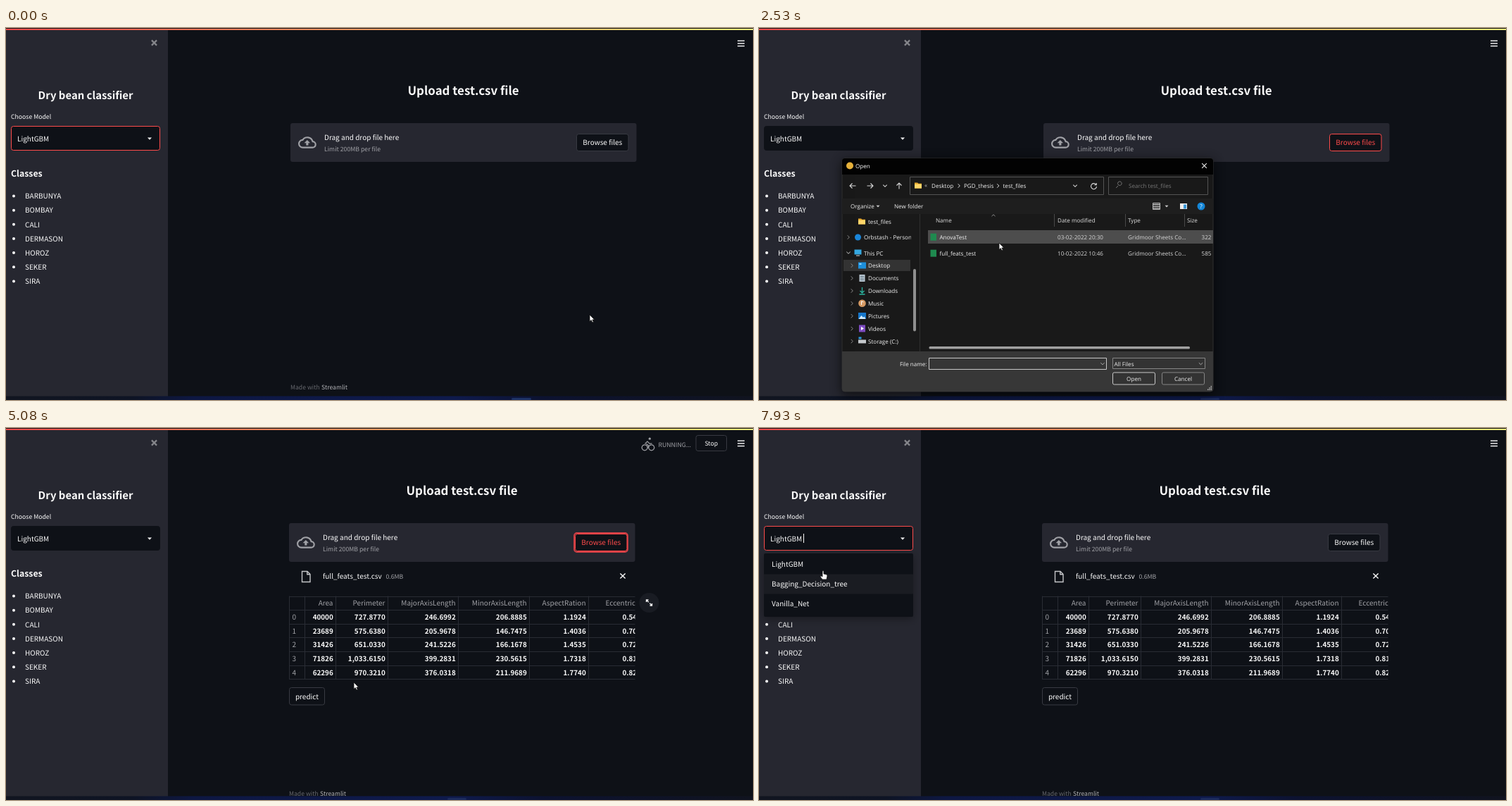
Animation of 1061 by 528 pixels, one loop 8 s. Source, as an HTML page with a canvas:

```html
<!DOCTYPE html>
<html lang="en">
<head>
<meta charset="utf-8">
<title>Dry bean classifier</title>
<style>
html, body { margin: 0; width: 100%; height: 100%; overflow: hidden; background: #0e1117; }
canvas { display: block; width: 1061px; height: 528px; }
</style>
</head>
<body>
<canvas id="stage" width="1061" height="528"></canvas>
<script>
const ctx = document.getElementById('stage').getContext('2d');
const LOOP = 8000;
const PAGE = '"Noto Sans CJK JP", "Noto Sans CJK SC", "Noto Sans CJK KR", "Noto Sans", sans-serif';
const SYSTEM = '"Open Sans", "Noto Sans", sans-serif';
const BG = '#0e1117', PANEL = '#262730', WHITE = '#fafafa', RED = '#ff4b4b';
const GREY = '#a0a1a6', EDGE = '#383a42', GRID = '#292c34';

// Moments at which the interface changes
const T = {
  press: 1390, dialogOpen: 1930, hoverFile: 2400, pickFile: 2740, dialogClose: 4410,
  uploaded: 4620, table: 4800, blur: 5880, done: 6250, menu: 6860, pointMenu: 7120
};

// Pointer stops: time, x, y
const PATH = [
  [0, 829, 407], [160, 829, 407], [920, 849, 164], [1060, 850, 165], [1390, 850, 165],
  [1790, 830, 172], [1860, 830, 172], [2190, 420, 236], [2270, 420, 236], [2530, 341, 305],
  [2810, 300, 317], [3030, 300, 317], [3780, 549, 513], [3850, 549, 513], [4060, 546, 504],
  [4200, 541, 497], [4340, 541, 497], [5080, 494, 361], [5150, 494, 361], [5750, 430, 380],
  [5980, 430, 380], [6720, 150, 167], [6790, 150, 167], [6990, 137, 174],
  [7590, 100, 245], [7660, 100, 245], [7930, 91, 203], [8000, 91, 203]
];
const HAND_TIMES = [[830, 1480], [5560, 6070], [6640, 6900], [T.pointMenu, LOOP]];

const within = (t, a, b) => t >= a && t < b;

function pointerAt(t) {
  const i = Math.max(1, PATH.findIndex(p => p[0] > t));
  const [t0, x0, y0] = PATH[i - 1], [t1, x1, y1] = PATH[i];
  const u = (t - t0) / (t1 - t0), e = u * u * (3 - 2 * u);
  return { x: x0 + (x1 - x0) * e, y: y0 + (y1 - y0) * e };
}

function box(x, y, w, h, fill, stroke, radius = 0, width = 1) {
  ctx.beginPath();
  ctx.roundRect(x, y, w, h, radius);
  if (fill) { ctx.fillStyle = fill; ctx.fill(); }
  if (stroke) { ctx.strokeStyle = stroke; ctx.lineWidth = width; ctx.stroke(); }
}

function disc(x, y, r, fill) {
  ctx.beginPath();
  ctx.arc(x, y, r, 0, Math.PI * 2);
  ctx.fillStyle = fill;
  ctx.fill();
}

function shape(d, x, y, scale, { fill, stroke, width = 1 }) {
  const path = new Path2D(d);
  ctx.save();
  ctx.translate(x, y);
  ctx.scale(scale, scale);
  if (fill) { ctx.fillStyle = fill; ctx.fill(path); }
  if (stroke) { ctx.strokeStyle = stroke; ctx.lineWidth = width; ctx.stroke(path); }
  ctx.restore();
}

const stroke = (d, x, y, color, width = 1) => shape(d, x, y, 1, { stroke: color, width });
const fill = (d, x, y, color) => shape(d, x, y, 1, { fill: color });

function write(str, x, y, size, color, align, weight, family) {
  ctx.font = `${weight} ${size}px ${family}`;
  ctx.textAlign = align;
  ctx.fillStyle = color;
  ctx.fillText(str, x, y);
}
const text = (str, x, y, size = 10, color = WHITE, align = 'left', weight = 400) =>
  write(str, x, y, size, color, align, weight, PAGE);
// Dialog labels are placed by their vertical centre
const label = (str, x, y, color = '#f0f0f0', align = 'left') =>
  write(str, x, y + 3, 8.1, color, align, 400, SYSTEM);

function clipped(x, y, w, h, draw) {
  ctx.save();
  ctx.beginPath();
  ctx.rect(x, y, w, h);
  ctx.clip();
  draw();
  ctx.restore();
}

const cross = (x, y, r, color, width) =>
  stroke(`M${-r} ${-r}L${r} ${r}M${r} ${-r}L${-r} ${r}`, x, y, color, width);

function button(str, x, y, w, h, size, hot) {
  box(x + .5, y + .5, w - 1, h - 1, BG, hot ? RED : EDGE, 3);
  text(str, x + w / 2, y + h / 2 + 3.8, size, hot ? RED : WHITE, 'center');
}

function drawSidebar(t) {
  box(0, 0, 230, 523, PANEL);
  cross(210.5, 21, 3.6, '#85868b', 2.2);
  text('Dry bean classifier', 113, 100.5, 14.9, WHITE, 'center', 600);
  text('Choose Model', 7, 129.3, 8.7);
  const focused = t < T.press || t >= 6790;
  box(7.5, 139.5, 211, 34, BG, focused ? RED : BG, 3);
  text('LightGBM', 16, 160.5);
  fill('M-3 -1.5H3L0 1.7Z', 204, 157, WHITE);
  text('Classes', 7, 211, 12.3, WHITE, 'left', 600);
  ['BARBUNYA', 'BOMBAY', 'CALI', 'DERMASON', 'HOROZ', 'SEKER', 'SIRA'].forEach((name, i) => {
    const y = 238.6 + i * 20.13;
    disc(11, y, 2, WHITE);
    text(name, 27, y + 3.7);
  });
}

function drawMenu(t, pointer) {
  if (t < T.menu) return;
  ctx.save();
  ctx.shadowColor = 'rgba(0,0,0,.35)';
  ctx.shadowBlur = 12;
  ctx.shadowOffsetY = 3;
  box(7, 178, 212, 90, BG, null, 2);
  ctx.restore();
  const pointing = t >= T.pointMenu;
  const row = pointing ? Math.min(2, Math.max(0, Math.floor((pointer.y + 5 - 179) / 28))) : 0;
  box(7, 179.5 + row * 28, 212, 28, pointing ? '#1a1c22' : '#21232b');
  ['LightGBM', 'Bagging_Decision_tree', 'Vanilla_Net'].forEach((name, i) =>
    text(name, 18, 197 + i * 28));
  if ((t - T.menu) % 1000 < 500) box(63, 150, 1, 13, WHITE);
}

function drawUploader(t, dx) {
  text('Upload test.csv file', 649.5 + dx, 94.5, 16.9, WHITE, 'center', 600);
  box(404 + dx, 135, 491.5, 55, PANEL, null, 3);
  ctx.save();
  ctx.translate(415 + dx, 149.3);
  shape('M6 19H19A4 4 0 0 0 19.2 11A7.3 7.3 0 0 0 6 9A5 5 0 0 0 6 19Z', 0, 0, 1.07, { stroke: GREY, width: 2 });
  shape('M8 13h2.55v3h2.9v-3H16l-4-4z', 0, 0, 1.07, { fill: GREY });
  ctx.restore();
  text('Drag and drop file here', 452 + dx, 158.8);
  text('Limit 200MB per file', 452 + dx, 175.4, 8.7, GREY);
  const hot = within(t, 840, T.blur);
  if (within(t, T.dialogClose, T.blur))
    box(809 + dx, 149, 76, 27, null, '#d64046', 4, 1.8);
  button('Browse files', 810 + dx, 150, 74.5, 25, 10, hot);
}

function drawTable() {
  const edges = [402.5, 424.5, 468.5, 542.5, 642.5, 743.5, 827.5];
  const heads = ['', 'Area', 'Perimeter', 'MajorAxisLength', 'MinorAxisLength', 'AspectRation'];
  const rows = [
    ['40000', '727.8770', '246.6992', '206.8885', '1.1924', '0.54'],
    ['23689', '575.6380', '205.9678', '146.7475', '1.4036', '0.70'],
    ['31426', '651.0330', '241.5226', '166.1678', '1.4535', '0.72'],
    ['71826', '1,033.6150', '399.2831', '230.5615', '1.7318', '0.81'],
    ['62296', '970.3210', '376.0318', '211.9689', '1.7740', '0.82']
  ];
  const pitch = 19.65;
  clipped(402, 238, 491.5, 120, () => {
    for (let i = 0; i < 7; i++) box(402, Math.round(238.5 + i * pitch), 492, 1, GRID);
    edges.forEach(x => box(x - .5, 238.5, 1, 118, GRID));
    heads.forEach((h, i) => text(h, (edges[i + 1] || 0) - 4, 252.2, 10, GREY, 'right'));
    text('Eccentricity', 851.5, 252.2, 10, GREY);
    rows.forEach((cells, r) => {
      const y = 272 + r * pitch;
      text(String(r), 406.5, y, 10, GREY);
      cells.forEach((value, c) => c < 5
        ? text(value, edges[c + 2] - 3.8, y, 9.85, WHITE, 'right', 600)
        : text(value, 875.5, y, 9.85, WHITE, 'left', 600));
    });
  });
}

function drawResults(t) {
  if (t < T.uploaded) return;
  stroke('M-5.5 -7.5H2L6 -3.5V7.5H-5.5ZM1.8 -7.5V-3.2H6', 426, 211, '#c4c5c8', 1.4);
  text('full_feats_test.csv', 450, 214.3);
  text('0.6MB', 539.5, 214.3, 8.7, GREY);
  cross(876, 210, 3.6, WHITE, 1.4);
  if (t < T.table) return;
  drawTable();
  if (t < 5260) {
    disc(913.5, 248, 14, '#191c23');
    stroke('M-4 -1V-4H-1M-4 -4L-.8 -.8M4 1V4H1M4 4L.8 .8', 913.5, 248, WHITE, 1.3);
  }
  button('predict', 402, 368, 51, 25.5, 10, within(t, 5560, 6070));
}

function drawToolbar(t) {
  [17.5, 21.2, 24.9].forEach(y => box(1039, y, 10, 1.4, WHITE));
  if (!within(t, T.uploaded, T.done)) return;
  stroke('M-4.8 -.2A4 4 0 1 1 -4.9 -.2M4.8 -.2A4 4 0 1 1 4.7 -.2M-4.5 -1.5L-1 -5L2 -1.8H5.5M-2.5 -1.5L.3 .8V4.5', 912, 24, GREY, 1.2);
  disc(914.3, 15.2, 1.6, GREY);
  text('RUNNING...', 926.5, 26.7, 8.7, GREY);
  button('Stop', 979.5, 10, 44.5, 23, 8.7, false);
}

function drawFooter(t, dx) {
  const y = t >= T.table ? 521.7 : 513.2;
  clipped(230, 480, 831, 43, () => {
    text('Made with', 404 + dx, y, 8.65, '#66686e');
    text('Streamlit', 448 + dx, y, 8.65, '#b0b1b5');
  });
}

function drawFrame(t) {
  const sky = ctx.createLinearGradient(0, 0, 1061, 0);
  [[0, '#111520'], [.17, '#0e1424'], [.25, '#0d1742'], [.6, '#0e1a4c'], [.72, '#0c1230'], [1, '#10131f']]
    .forEach(stop => sky.addColorStop(...stop));
  box(0, 522.5, 1061, 6, sky);
  if (t < 500) box(718, 525, 28, 3, '#1d3164', null, 1.5);
  if (t > 1650) box(627, 525, 27, 3, '#1c2b5c', null, 1.5);
  const ribbon = ctx.createLinearGradient(0, 0, 1061, 0);
  ribbon.addColorStop(0, '#f84b4b');
  ribbon.addColorStop(1, '#f5f27c');
  box(0, 0, 1061, 1, '#15161b');
  box(0, 1, 1061, 2, ribbon);
}

const CHEVRON_RIGHT = 'M-1.3 -2.7L1.3 0L-1.3 2.7';
const CHEVRON_DOWN = 'M-2.7 -1.3L0 1.3L2.7 -1.3';

function folder(x, y) {
  fill('M-5 -4H-1L.5 -2.8H5V4H-5Z', x, y, '#e8a92c');
  box(x - 5, y - 1.8, 10, 5.8, '#ffd66b');
}

function drawDialogNav() {
  [['M4.5 0H-4M-.5 -3.5L-4 0L-.5 3.5', 133], ['M-4.5 0H4M.5 -3.5L4 0L.5 3.5', 158],
   [CHEVRON_DOWN, 179], ['M0 4.5V-4M-3.5 -.5L0 -4L3.5 -.5', 199], [CHEVRON_DOWN, 449]]
    .forEach(([d, x]) => stroke(d, x, 224, '#d8d8d8', 1.1));
  box(214.5, 211.5, 275, 25, null, '#535353');
  folder(226, 223.5);
  label('«', 235, 223, '#bbb');
  label('Desktop', 245, 223.5);
  label('PGD_thesis', 291, 223.5);
  label('test_files', 346.5, 223.5);
  stroke(CHEVRON_RIGHT, 284, 224, '#ddd');
  stroke(CHEVRON_RIGHT, 339.5, 224, '#ddd');
  stroke('M3 -2.5A4 4 0 1 0 4 .5M3.7 -4.5V-1.8H1', 475.5, 224.5, '#ddd', 1.1);
  box(496.5, 211.5, 141, 25, null, '#535353');
  stroke('M-3.8 4L-1 1M-1.2 -1.2A2.8 2.8 0 1 1 -1.1 -1', 511, 223, '#777');
  label('Search test_files', 525, 223.5, '#777');

  box(118, 242, 527, 22, '#1e1e1e');
  label('Organize', 130, 253);
  fill('M-2.5 -1.2H2.5L0 1.5Z', 169, 253, '#ccc');
  label('New folder', 192, 253);
  box(559.5, 248.5, 10, 9, '#333', '#bbb');
  for (let i = 0; i < 3; i++) box(560, 250 + i * 2.7, 9, 1, '#ddd');
  fill('M-2.5 -1.2H2.5L0 1.5Z', 579, 253, '#ccc');
  box(598, 249, 10, 8, '#eee');
  box(603, 250.5, 4, 6, '#3a97d8');
  disc(628, 253, 5.5, '#1486d8');
  label('?', 628, 253, '#fff', 'center');
}

function drawDialogTree() {
  folder(146, 274.5);
  label('test_files', 155, 274.5);
  stroke(CHEVRON_RIGHT, 127, 297, '#888');
  disc(140.5, 297, 4.5, '#1a86d9');
  clipped(118, 288, 98, 18, () => label('Orbstash - Personal', 149, 297));
  stroke(CHEVRON_DOWN, 127, 319, '#ccc');
  box(135.5, 314.5, 10, 7, '#35a8e0');
  box(138, 322.5, 5, 1.2, '#bbb');
  label('This PC', 149, 319.5);
  box(120, 329, 95, 16, '#333333');
  ['Desktop', 'Documents', 'Downloads', 'Music', 'Pictures', 'Videos', 'Storage (C:)'].forEach((name, i) => {
    const y = 337.2 + i * 17.9;
    stroke(CHEVRON_RIGHT, 132, y, '#888');
    label(name, 155, y);
  });
  box(141, 332.5, 11, 9, '#1d8fdb');
  box(142.5, 334, 3, 2, '#8fd4ff');
  box(142.5, 350, 8, 10, '#b9c6d0');
  for (let i = 0; i < 3; i++) box(144, 352 + i * 2.5, 5, 1, '#5d7380');
  stroke('M0 -5V3M-3 0L0 3L3 0M-4 5H4', 146.5, 373, '#2bb5a0', 1.3);
  disc(146.5, 390.7, 5.3, '#d59a63');
  stroke('M-1 2V-3L2 -2', 146.5, 391, '#fff');
  box(141, 404, 11, 9, '#1676c9');
  fill('M-5 4L-1 -1L1.5 2L3 .5L5 4Z', 146.5, 409, '#d7efff');
  box(142, 421.5, 9, 10, '#7d4bc0');
  fill('M-1.5 -2.5L2.5 0L-1.5 2.5Z', 146.5, 426.5, '#fff');
  box(141, 442.5, 11, 5, '#c5c9cc');
  box(141.5, 438.5, 4, 3, '#2a9be0');
  box(219, 342, 4, 88.5, '#8f8f8f', null, 2);
  box(228, 264, 1, 195, '#2f2f2f');
}

function drawDialogFiles(t) {
  stroke('M-2.5 1.2L0 -1.2L2.5 1.2', 333, 266, '#999', .9);
  [419, 520, 604].forEach(x => box(x, 264, 1, 18, '#484848'));
  [['Name', 251], ['Date modified', 424], ['Type', 524], ['Size', 608]]
    .forEach(([name, x]) => label(name, x, 273, '#dedede'));
  if (within(t, T.hoverFile, 2620)) box(240, 287, 405, 19, '#4d4d4d');
  if (within(t, 2620, T.pickFile)) box(240, 310, 405, 19, '#4d4d4d');
  if (t >= T.pickFile) box(240.5, 310.5, 404, 18, '#777777', t < 3200 ? '#999' : '#777');
  [['AnovaTest', '03-02-2022 20:30', '322'], ['full_feats_test', '10-02-2022 10:46', '585']]
    .forEach(([name, date, size], i) => {
      const y = 296.7 + i * 23;
      box(243.5, y - 5, 8.5, 10, '#1f8a4f');
      label(name, 256.5, y);
      label(date, 424, y, '#d6d6d6');
      label('Gridmoor Sheets Co...', 524, y, '#d6d6d6');
      label(size, 642.5, y, '#d6d6d6', 'right');
    });
  box(241.5, 452, 370.5, 3.5, '#a0a0a0', null, 1.5);
}

function drawDialogActions(t) {
  box(118, 459, 527, 57, '#373737', null, [0, 0, 4, 4]);
  label('File name:', 238.5, 476.5, '#f0f0f0', 'right');
  box(241.5, 468.5, 252, 16, '#363636', '#c8c8c8');
  if (t >= T.pickFile) label('full_feats_test', 244, 476.5);
  box(502.5, 468.5, 131, 15, '#333', '#858585');
  label('All Files', 504.5, 476.5);
  stroke(CHEVRON_DOWN, 488, 476.5, '#aaa');
  stroke(CHEVRON_DOWN, 627.5, 476.5, '#aaa');
  const over = within(t, 4090, T.dialogClose);
  box(502.5, 489, 60, 17, over ? '#474747' : '#333', '#c8c8c8', 2);
  label('Open', 532.5, 497.5, '#f0f0f0', 'center');
  box(572.5, 489, 60, 17, '#333', '#858585', 2);
  label('Cancel', 602.5, 497.5, '#f0f0f0', 'center');
  for (let r = 0; r < 3; r++)
    for (let c = 2 - r; c < 3; c++) box(637 + c * 2.3, 508 + r * 2.3, 1.4, 1.4, '#bbb');
}

function drawDialog(t) {
  if (!within(t, T.dialogOpen, T.dialogClose)) return;
  ctx.save();
  ctx.shadowColor = 'rgba(0,0,0,.65)';
  ctx.shadowBlur = 16;
  ctx.shadowOffsetY = 4;
  box(118, 185, 527, 331, '#191919', '#303030', 4);
  ctx.restore();
  box(118, 185, 527, 23, '#020202', null, [4, 4, 0, 0]);
  disc(129, 195.5, 5, '#e5b03a');
  label('Open', 137, 195.7, '#fff');
  cross(632.5, 195.5, 3.3, '#f0f0f0', 1.1);
  drawDialogNav();
  drawDialogTree();
  drawDialogFiles(t);
  drawDialogActions(t);
}

function drawPointer(t, { x, y }) {
  const hand = HAND_TIMES.some(([a, b]) => within(t, a, b));
  const d = hand
    ? 'M-1 0Q0 -1 1 0V4L5 5Q6 5.3 6 7L5 12H-1L-4 8Q-4 6.5 -2.7 7L-1 8Z'
    : 'M0 0V9.6L2.2 7.6L3.8 11L5.4 10.2L3.9 7H6.8Z';
  shape(d, x, y, 1, { fill: '#fff', stroke: '#111', width: .8 });
}

function render(now) {
  const t = now % LOOP, pointer = pointerAt(t);
  const dx = t >= T.table ? -2 : 0;
  ctx.textRendering = 'geometricPrecision';
  box(0, 0, 1061, 528, BG);
  drawSidebar(t);
  drawUploader(t, dx);
  drawResults(t);
  drawToolbar(t);
  drawFooter(t, dx);
  drawFrame(t);
  drawMenu(t, pointer);
  drawDialog(t);
  drawPointer(t, pointer);
}

const start = performance.now();
function tick() {
  render(performance.now() - start);
  requestAnimationFrame(tick);
}
tick();
</script>
</body>
</html>
```
